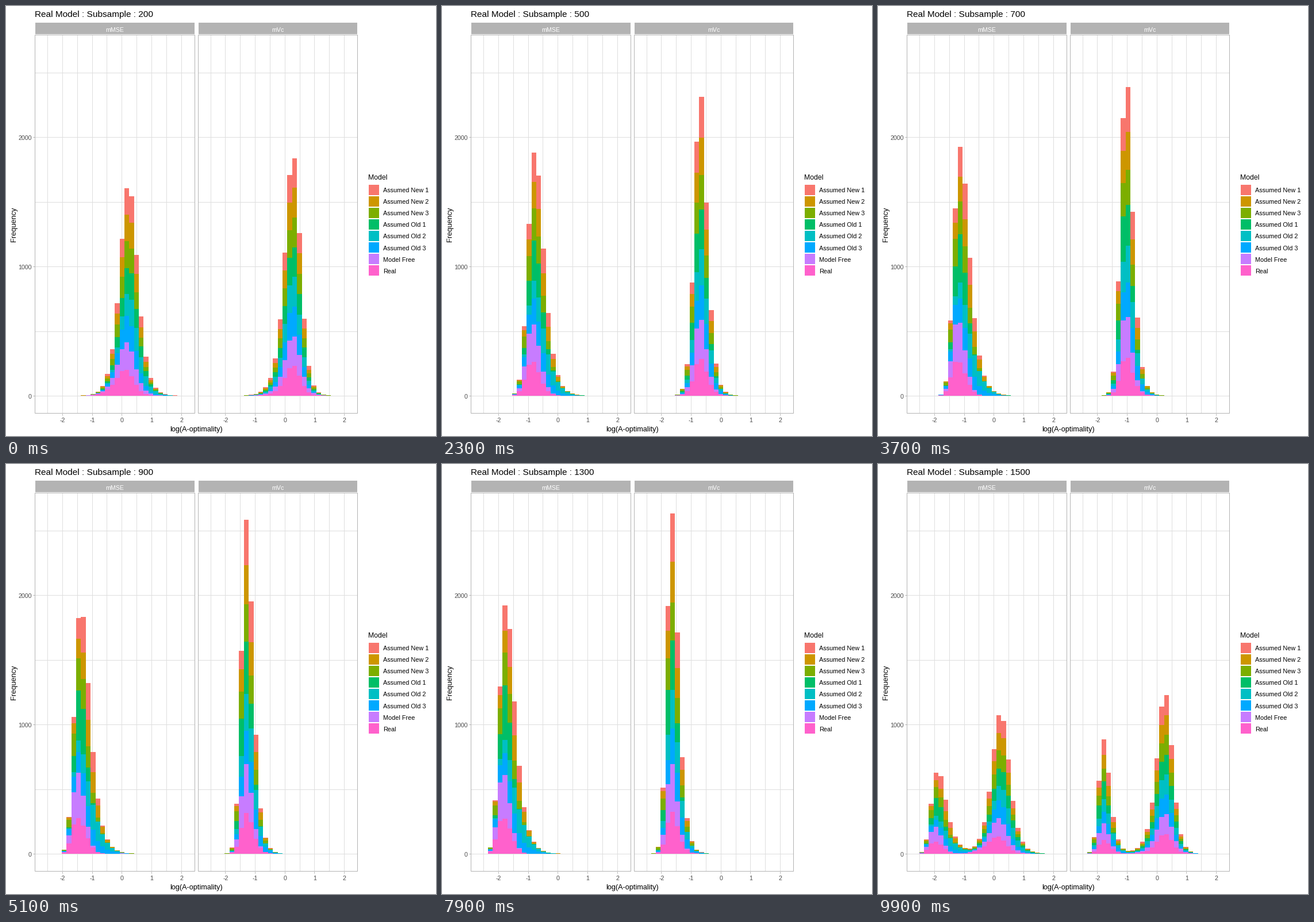
These frames come from a looping animation (748 px wide and 748 px high, 10000 ms). A matplotlib script:

```python
import numpy as np
import matplotlib.pyplot as plt
from matplotlib.animation import FuncAnimation
from matplotlib.patches import Polygon, Rectangle

SIZE, DPI = 748, 100
PX = 72 / DPI
FRAMES, INTERVAL = 100, 100

# Bottom of the stack first
MODELS = [("Real", "#FF61CC"), ("Model Free", "#C77CFF"),
          ("Assumed Old 3", "#00A9FF"), ("Assumed Old 2", "#00BFC4"),
          ("Assumed Old 1", "#00BE67"), ("Assumed New 3", "#7CAE00"),
          ("Assumed New 2", "#CD9600"), ("Assumed New 1", "#F8766D")]
SAMPLES = np.arange(200, 1501, 100)
TOTAL = 1000 * len(MODELS)

BINS = np.arange(-16, 14)
EDGES = np.arange(-16.5, 14)
BIN_W, UNIT = 8.39, 51.65
BASE, PER_COUNT = 678, 0.225
GRID, EDGE, TICK = "#DEDEDE", "#B3B3B3", "#4D4D4D"
TOP, BOTTOM = 50, 708


def skewed(mode, scale, log_a):
    """Bin counts of a generalised logistic distribution."""
    z = (EDGES - mode) / scale + log_a
    cdf = (1 + np.exp(-z)) ** -np.exp(log_a)
    return TOTAL * np.diff(cdf) + 1e-6


def split(total, offset, spread):
    """Share each bin between the models, all models equally large."""
    mean = (BINS * total).sum() / total.sum()
    z = (BINS - mean - offset[:, None]) / spread[:, None]
    w = np.exp(-z ** 2 / 2) + 1e-4
    for _ in range(40):
        w *= TOTAL / len(MODELS) / w.sum(axis=1, keepdims=True)
        w *= total / w.sum(axis=0)
    return w


class Panel:
    """One facet; its histogram drifts left as the subsample grows."""

    def __init__(self, name, left, right, zero, outline, start, end, spread):
        self.name, self.left, self.right, self.zero = name, left, right, zero
        start, end = np.array(start), np.array(end)
        wide, narrow = spread[0], np.array(spread[1])
        self.stacks = []
        for n in SAMPLES:
            grow = np.log(n / 200)
            u = min(1, grow / 1.5)
            shares = split(skewed(*outline(grow)), start + (end - start) * u,
                           wide + (narrow - wide) * u)
            self.stacks.append(np.cumsum(shares, axis=0))


# outline: mode, scale and log skew; start/end: model offsets in bins
PANELS = [
    Panel("mMSE", 50, 328, 201.7,
          lambda g: (1.38 - 6.95 * g + .24 * g * g,
                     1.2 + .2 * min(1, g / 1.5), min(1.3 * g, 2.1)),
          start=[-.8, -.25, 0, .8, .15, -.15, .05, .15],
          end=[-.8, -.95, .2, 1.15, -.6, -.4, .5, .4],
          spread=(1.85, [1.45, 1.15, 1.9, 1.6, .9, 1.5, 1.6, 1.2])),
    Panel("mVc", 334, 611, 485.2,
          lambda g: (1.68 - 6.65 * g + .17 * g * g,
                     .92, min(.85 * g - .36, 1.1)),
          start=np.zeros(8),
          end=[-.1, -.35, .25, .2, -.55, -.2, .1, .15],
          spread=(1.7, [1.35, 1.15, 1.5, 1.4, 1.05, 1.5, 1.35, 1.1])),
]

# Transitions as (first frame, steps)
MOVES = [(s, 4) for s in (4, 12, 20)] + [(s, 3) for s in range(28, 99, 7)]


def phase(frame):
    """State index and linear progress towards the next state."""
    for i in reversed(range(len(MOVES))):
        start, steps = MOVES[i]
        if frame >= start:
            t = (frame - start + 1) / steps
            return (i, t) if t < 1 else (i + 1, 0)
    return 0, 0


plt.rcParams["font.family"] = "Liberation Sans"
fig = plt.figure(figsize=(SIZE / DPI, SIZE / DPI), dpi=DPI, facecolor="white")
ax = fig.add_axes([0, 0, 1, 1])
ax.set_xlim(0, SIZE)
ax.set_ylim(SIZE, 0)
ax.axis("off")


def line(x0, y0, x1, y1, color):
    # the small shift keeps snapping stable on whole pixels
    ax.plot([x0 + .1, x1 + .1], [y0 + .1, y1 + .1], color=color, lw=PX,
            zorder=1, solid_capstyle="butt")


def box(x0, y0, x1, y1, color):
    ax.add_patch(Rectangle((x0, y0), x1 - x0, y1 - y0, fc=color, lw=0))


def text(x, y, s, px, color="black", ha="left"):
    return ax.text(x, y, s, fontsize=px * PX, color=color, ha=ha,
                   va="baseline")


def y_of(count):
    return BASE - count * PER_COUNT


for p in PANELS:
    box(p.left + 1, 29, p.right, 49, EDGE)
    text((p.left + p.right) / 2, 44.5, p.name, 10.6, "white", "center")
    for i in range(-5, 5):
        x = np.floor(p.zero + i * UNIT / 2)
        line(x, TOP, x, BOTTOM, GRID)
    for count in range(0, 2501, 500):
        line(p.left, y_of(count), p.right, y_of(count), GRID)
    for i in range(-2, 3):
        x = p.zero + i * UNIT
        line(np.floor(x), BOTTOM + 1, np.floor(x), BOTTOM + 4, EDGE)
        text(x, 723.5, str(i), 10.6, TICK, "center")
    ax.add_patch(Rectangle((p.left + .1, TOP + .1), p.right - p.left,
                           BOTTOM - TOP, fill=False, ec=EDGE, lw=PX, zorder=5))

for count in (0, 1000, 2000):
    line(47, y_of(count), 50, y_of(count), EDGE)
    text(45, y_of(count) + 5, str(count), 10.6, TICK, "right")

text(331, 740, "log(A-optimality)", 12.6, ha="center")
ax.text(20, 379.5, "Frequency", fontsize=12.8 * PX, rotation=90,
        ha="right", va="center")

text(630, 302, "Model", 12.3)
for i, (name, color) in enumerate(reversed(MODELS)):
    y = 310.6 + 20.06 * i
    box(630.6, y, 649, y + 18.4, color)
    text(656, y + 13.6, name, 10.85)

title = text(50.5, 19, "", 15.45)


def layer(color, z):
    poly = Polygon([[0, 0], [1, 0], [1, 1]], fc=color, lw=0, zorder=z)
    poly.set_snap(True)
    return ax.add_patch(poly)


# Each layer reaches down to the base; lower ones cover the taller ones
bars = [[layer(color, 3 - i / 10) for i, (_, color) in enumerate(MODELS)]
        for _ in PANELS]


def skyline(zero, counts):
    x = np.repeat(zero + EDGES * BIN_W, 2)
    y = y_of(np.concatenate([[0], np.repeat(counts, 2), [0]]))
    return np.column_stack([x, y])


def draw(frame):
    state, t = phase(frame)
    here, after = state % len(SAMPLES), (state + 1) % len(SAMPLES)
    title.set_text(f"Real Model : Subsample : {SAMPLES[here]}")
    for p, layers in zip(PANELS, bars):
        now = (1 - t) * p.stacks[here] + t * p.stacks[after]
        for poly, counts in zip(layers, now):
            poly.set_xy(skyline(p.zero, counts))
    return [title] + bars[0] + bars[1]


anim = FuncAnimation(fig, draw, frames=FRAMES, interval=INTERVAL, repeat=True,
                     repeat_delay=0, init_func=lambda: draw(0), blit=False)
plt.show()
```
